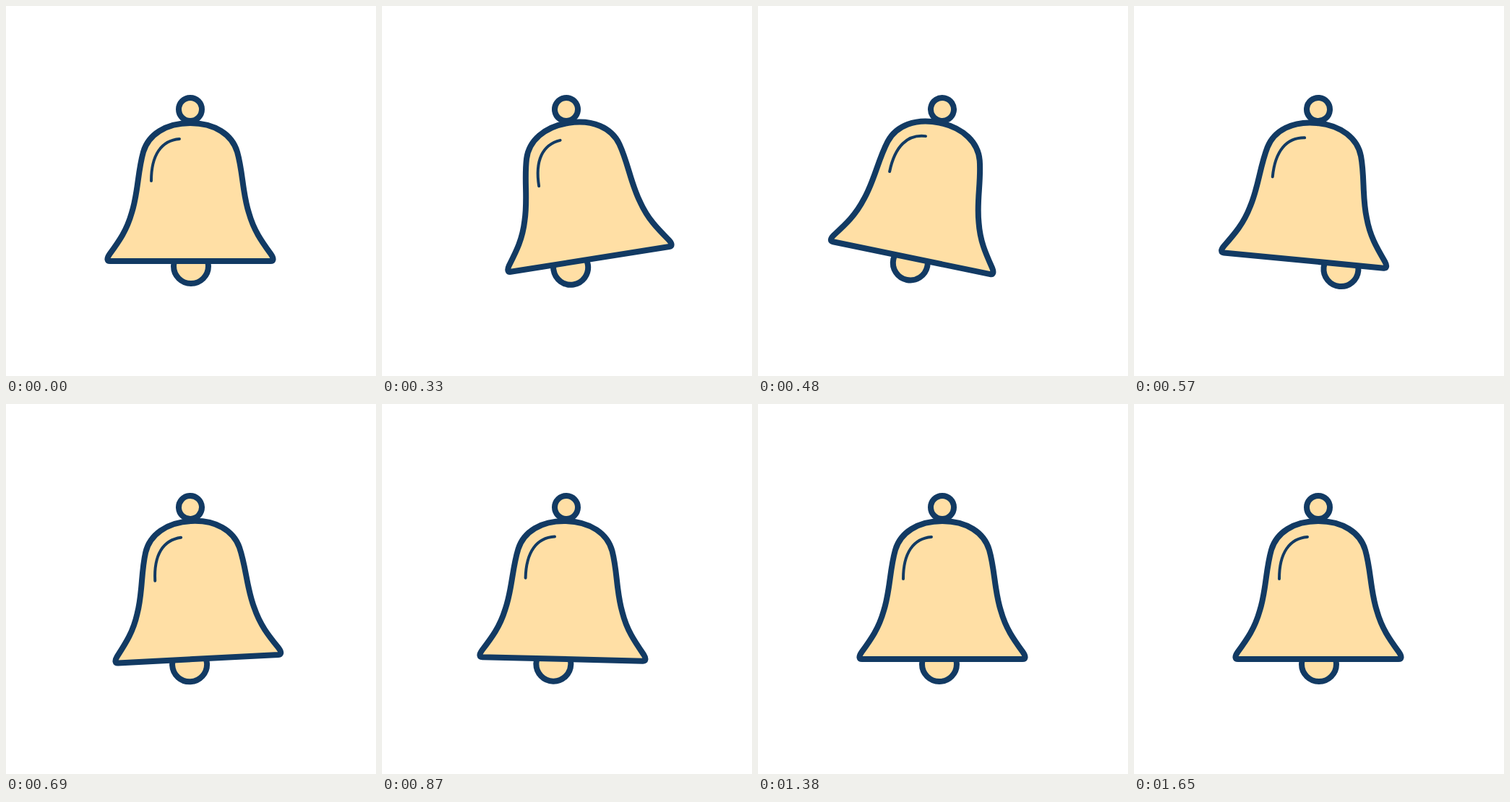
Animation, 512 px wide and 512 px high, one loop 2.22 s. Source, as an HTML page without scripts:

```html
<!DOCTYPE html>
<html lang="en">
<head>
<meta charset="utf-8">
<title>Ringing bell</title>
<style>
  @property --tick {
    syntax: "<number>";
    inherits: true;
    initial-value: 0;
  }

  html, body {
    margin: 0;
    width: 100%;
    height: 100%;
    overflow: hidden;
    background: #fff;
  }

  svg {
    display: block;
    width: 100%;
    height: 100%;
    fill: #ffdfa5;
    stroke: #123a63;
    stroke-width: 8;
    stroke-linecap: round;
    stroke-linejoin: round;
    animation: clock 2220ms steps(74) -1ms infinite;
  }

  @keyframes clock {
    from { --tick: 0; }
    to { --tick: 74; }
  }

  /* Each swing eases from 0 to 1: (ticks since its start) / duration */
  .bell {
    --t: calc(var(--tick) - 10);
    --push: calc((1 - cos(clamp(0, var(--t) / 2.2, 1) * 180deg)) / 2);
    --swing1: calc((1 - cos(clamp(0, (var(--t) - 2.2) / 5.1, 1) * 180deg)) / 2);
    --swing2: calc((1 - cos(clamp(0, (var(--t) - 7.3) / 3.7, 1) * 180deg)) / 2);
    --swing3: calc((1 - cos(clamp(0, (var(--t) - 11) / 4, 1) * 180deg)) / 2);
    --settle: calc((1 - cos(clamp(0, (var(--t) - 15) / 6.7, 1) * 180deg)) / 2);
    transform-origin: 255px 143px;
    transform: rotate(calc(1deg * (
      -21 * var(--push) + 38.5 * var(--swing1) - 27.5 * var(--swing2)
      + 14 * var(--swing3) - 4 * var(--settle))));
  }

  .clapper {
    --slide1: calc((1 - cos(clamp(0, (var(--t) - 2.2) / 7.1, 1) * 180deg)) / 2);
    --slide2: calc((1 - cos(clamp(0, (var(--t) - 9.3) / 5.9, 1) * 180deg)) / 2);
    --slide3: calc((1 - cos(clamp(0, (var(--t) - 15.2) / 8.6, 1) * 180deg)) / 2);
    --slide4: calc((1 - cos(clamp(0, (var(--t) - 23.8) / 7.2, 1) * 180deg)) / 2);
    --rest: calc((1 - cos(clamp(0, (var(--t) - 31) / 14, 1) * 180deg)) / 2);
    transform: translateX(calc(1px * (
      -68 * var(--push) + 120 * var(--slide1) - 94 * var(--slide2)
      + 70 * var(--slide3) - 35 * var(--slide4) + 7 * var(--rest))));
  }

  .shine {
    fill: none;
    stroke-width: 4;
  }
</style>
</head>
<body>
<svg viewBox="0 0 512 512" role="img" aria-label="Ringing bell">
  <g class="bell">
    <circle class="clapper" cx="256" cy="360" r="24"/>
    <path d="M255 162
      C221 162 197 178 190 202 C182 230 183 258 174 286
      C167 311 156 326 143 344 C139 350 140 353 144 353
      H366 C370 353 371 350 367 344
      C354 326 343 311 336 286 C327 258 328 230 320 202
      C313 178 289 162 255 162Z"/>
    <path class="shine" d="M240 184 C215 186 201 206 201 242"/>
    <circle cx="255" cy="143" r="16"/>
  </g>
</svg>
</body>
</html>
```
